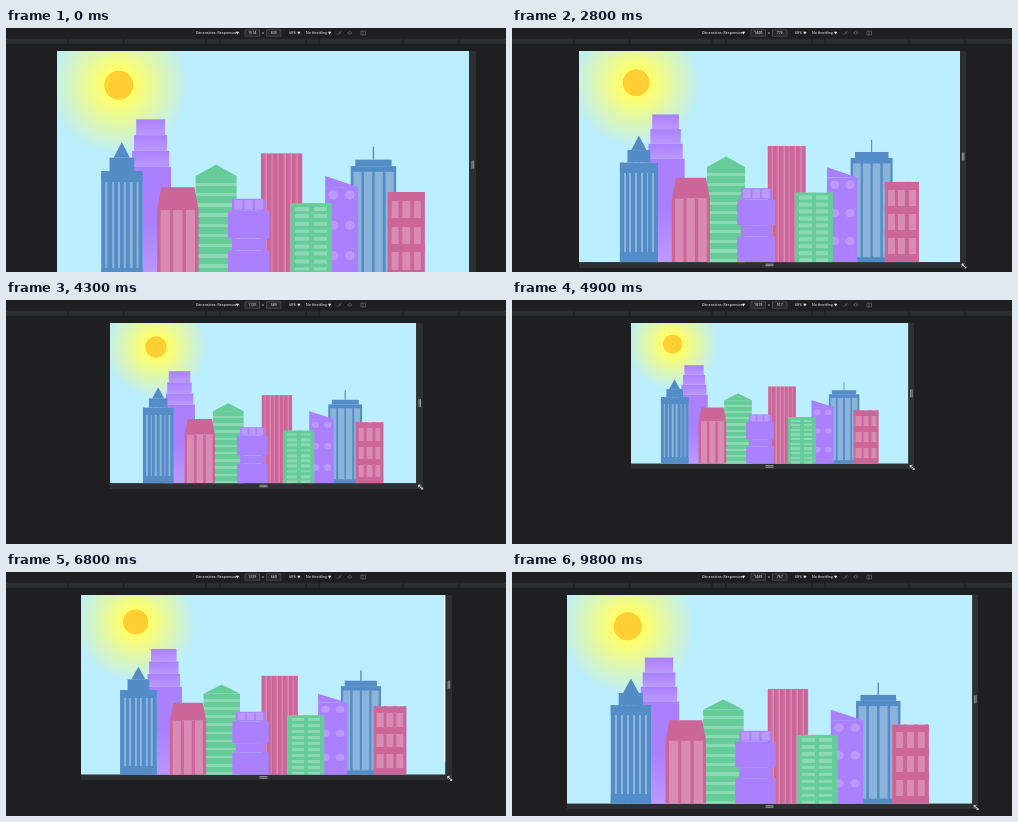
Recreate the animation shown at these times as an HTML page. Size 500 by 244 pixels, loop 10 s.

```html
<!DOCTYPE html>
<html lang="en">
<head>
<meta charset="utf-8">
<title>Responsive skyline</title>
<style>
* { box-sizing: border-box; }
html, body { margin: 0; width: 100%; height: 100%; overflow: hidden; background: #1f1f22; }
#stage { position: relative; width: 500px; height: 244px; overflow: hidden; }
#stage > svg { position: absolute; left: 0; top: 0; }
#bar { position: absolute; top: 23px; background: #2e2f33; }
#city {
  --b1: #aa80ff; --b2: #66cc99; --b3: #cc6699; --b4: #538cc6;
  --w1: #bb99ff; --w2: #8cd9b3; --w3: #d98cb3; --w4: #8cb3d9;
  position: absolute; top: 23px; overflow: hidden;
  transform-origin: 0 0; container-type: size;
}
#city.night { --b1: #000; --b2: #000; --b3: #000; --b4: #000; }
#city.night::after { content: ""; position: absolute; left: 0; bottom: 0; width: 100%; height: 3px; background: #667; }
.layer { position: absolute; inset: 0; display: flex; align-items: flex-end; justify-content: space-evenly; }
.sky { background: radial-gradient(circle closest-corner at 15% 15%, #ffcf33 20%, #ffff66 21%, #bbeeff 100%); }
.night .sky { background: radial-gradient(circle closest-corner at 15% 15%, #ccc 20%, #445 20%, #223 100%); }
.wrap { display: flex; flex-direction: column; align-items: center; }
.panes { display: flex; align-items: center; justify-content: space-evenly; }

.bb1 { width: 10%; height: 70%; }
.bb1 > * { height: 10%; background: linear-gradient(var(--b1), var(--w1)); }
.bb1a { width: 70%; } .bb1b { width: 80%; } .bb1c { width: 90%; }
.bb1 > .bb1d { width: 100%; height: 70%; background: linear-gradient(var(--b1) 50%, var(--w1)); }
.bb2 { width: 10%; height: 50%; }
.bb2a { border: solid transparent; border-width: 0 5cqw 5cqh; border-bottom-color: var(--b2); }
.bb2b { height: 100%; background: repeating-linear-gradient(var(--b2) 0 6%, var(--w2) 6% 9%); }
.bb3 { width: 10%; height: 55%; background: repeating-linear-gradient(90deg, var(--b3), var(--b3), var(--w3) 15%); }
.bb4 { width: 11%; height: 58%; }
.bb4 > * { background: var(--b4); }
.bb4a { width: 3%; height: 10%; } .bb4b { width: 80%; height: 5%; } .bb4c { width: 100%; height: 85%; }
.bb4c i { width: 18%; height: 90%; background: var(--w4); }

.fb1 { width: 10%; height: 60%; }
.fb1a { border: solid transparent; border-width: 0 2cqw 7cqh; border-bottom-color: var(--b4); }
.fb1b { width: 60%; height: 10%; background: var(--b4); }
.fb1c {
  width: 100%; height: 80%;
  background: repeating-linear-gradient(90deg, var(--b4) 0 10%, transparent 10% 15%),
    repeating-linear-gradient(var(--b4) 0 10%, var(--w4) 10% 90%);
}
.fb2 { width: 10%; height: 40%; }
.fb2a { border: solid transparent; border-width: 0 1cqw 10cqh; border-bottom-color: var(--b3); }
.fb2b { height: 75%; background: var(--b3); }
.fb2b i { width: 22%; height: 100%; background: var(--w3); }
.fb3 { width: 10%; height: 35%; }
.fb3 > * { background: var(--b1); }
.fb3a { width: 80%; height: 15%; } .fb3b { width: 100%; height: 35%; }
.fb3a i { width: 25%; height: 80%; background: var(--w1); }
.fb4 { width: 8%; height: 45%; position: relative; left: 10%; }
.fb4a { border-top: 5cqh solid transparent; border-left: 8cqw solid var(--b1); }
.fb4b { height: 89%; background: var(--b1); display: flex; flex-wrap: wrap; }
.fb4b i { width: 30%; height: 10%; margin: 10%; border-radius: 50%; background: var(--w1); }
.fb5 {
  width: 10%; height: 33%; position: relative; right: 10%;
  background: repeating-linear-gradient(var(--b2) 0 5%, transparent 5% 10%),
    repeating-linear-gradient(90deg, var(--b2) 0 12%, var(--w2) 12% 44%);
}
.fb6 {
  width: 9%; height: 38%;
  background: repeating-linear-gradient(90deg, var(--b3) 0 10%, transparent 10% 30%),
    repeating-linear-gradient(var(--b3) 0 10%, var(--w3) 10% 30%);
}
.gap { position: absolute; right: 0; top: 0; width: 6px; height: 93%; background: #f4f8fa; }
text { font: 3.75px Roboto, "Open Sans", sans-serif; fill: #e4e6e9; }
</style>
</head>
<body>
<div id="stage">
  <div id="bar"></div>
  <div id="city">
    <div class="layer sky">
      <b></b><b></b>
      <div class="bb1 wrap"><div class="bb1a"></div><div class="bb1b"></div><div class="bb1c"></div><div class="bb1d"></div></div>
      <div class="bb2"><div class="bb2a"></div><div class="bb2b"></div></div>
      <div class="bb3"></div>
      <b></b>
      <div class="bb4 wrap"><div class="bb4a"></div><div class="bb4b"></div><div class="bb4c panes"><i></i><i></i><i></i><i></i></div></div>
      <b></b><b></b>
    </div>
    <div class="layer">
      <b></b><b></b>
      <div class="fb1 wrap"><div class="fb1a"></div><div class="fb1b"></div><div class="fb1c"></div></div>
      <div class="fb2"><div class="fb2a"></div><div class="fb2b panes"><i></i><i></i><i></i></div></div>
      <b></b>
      <div class="fb3 wrap"><div class="fb3a panes"><i></i><i></i><i></i></div><div class="fb3b"></div><div class="fb3a"></div><div class="fb3b"></div></div>
      <div class="fb4"><div class="fb4a"></div><div class="fb4b"><i></i><i></i><i></i><i></i><i></i><i></i></div></div>
      <div class="fb5"></div>
      <div class="fb6"></div>
      <b></b><b></b>
    </div>
    <div class="gap" id="gap"></div>
  </div>
  <svg width="500" height="244" fill="none">
    <path d="M0 13.2H500" stroke="#2b2c2f" stroke-width="5"/>
    <path d="M62 10.7v5M117.5 10.7v5M200 10.7v5M214 10.7v5M300 10.7v5M313 10.7v5M397 10.7v5M453 10.7v5" stroke="#1c1c1f"/>
    <path d="M239 1.7h14.5v6.6H239zM260.5 1.7H275v6.6h-14.5z" fill="#28292c" stroke="#5b5d61" stroke-width=".6"/>
    <text x="190" y="6.3">Dimensions: Responsive</text>
    <text id="wide" x="246.2" y="6.3" text-anchor="middle"></text>
    <text x="256" y="6.3">x</text>
    <text id="high" x="267.8" y="6.3" text-anchor="middle"></text>
    <text x="283" y="6.3">68%</text>
    <text x="300" y="6.3">No throttling</text>
    <path d="M229.8 3.8h3.4l-1.7 2.6zM291.2 3.8h3.4l-1.7 2.6zM322 3.8h3.4l-1.7 2.6z" fill="#e4e6e9"/>
    <g stroke="#606266" stroke-width=".8">
      <path d="M331.5 7l4-4M332.5 3.6l2.2 2.2M341.5 5q2.3-2.6 4.6 0q-2.3 2.6-4.6 0M355 3.2h4.5v3.8H355zM357 3.2v3.8"/>
    </g>
    <path id="grips" stroke="#a5a7aa" stroke-width=".9"/>
    <g id="corner">
      <path d="M1.2 4.5L4.8 1M3 5l2-2" stroke="#a5a7aa" stroke-width=".6"/>
      <path d="M2 1.8l4 4M2 3.4V1.8h1.6M6 4.2v1.6H4.4" stroke="#fff" stroke-width=".8"/>
    </g>
  </svg>
</div>
<script>
const $ = id => document.getElementById(id);
const SCALE = 0.2722, MID = 257.5, TOP = 23;
// time, viewport width, viewport height
const keys = [
  [0, 1514, 835], [1850, 1514, 835], [2800, 1400, 776], [3600, 1230, 666],
  [4000, 1178, 625], [4900, 1019, 517], [5400, 972, 492], [5800, 971, 497],
  [6200, 1050, 545], [6800, 1339, 660], [7300, 1489, 755], [8400, 1489, 767], [10000, 1489, 767]
];

function sizeAt(t) {
  const i = keys.findIndex(k => k[0] > t);
  const a = keys[i - 1], b = keys[i], p = (t - a[0]) / (b[0] - a[0]);
  return [1, 2].map(n => Math.round(a[n] + (b[n] - a[n]) * p));
}

function draw(now) {
  const t = Math.floor(now % 10000 / 100) * 100;
  const [w, h] = sizeAt(t);
  const pw = w * SCALE, ph = h * SCALE, left = MID - pw / 2;
  const right = left + pw, bottom = TOP + ph, midY = TOP + ph / 2;

  Object.assign($('bar').style, { left: left + 'px', width: pw + 6.3 + 'px', height: ph + 5.3 + 'px' });
  Object.assign($('city').style, { left: left + 'px', width: w + 'px', height: h + 'px', transform: `scale(${SCALE})` });
  $('city').classList.toggle('night', w <= 1000);
  $('gap').hidden = t < 6300 || t > 7200;

  $('wide').textContent = w;
  $('high').textContent = h;
  const x = right + 2.4, y = bottom + 2;
  $('grips').setAttribute('d',
    `M${x} ${midY - 4}v8M${x + 1.5} ${midY - 4}v8M${MID - 4} ${y}h8M${MID - 4} ${y + 1.5}h8`);
  $('corner').setAttribute('transform', `translate(${right} ${bottom})`);
}

const start = performance.now();
(function tick() {
  draw(performance.now() - start);
  requestAnimationFrame(tick);
})();
</script>
</body>
</html>
```
